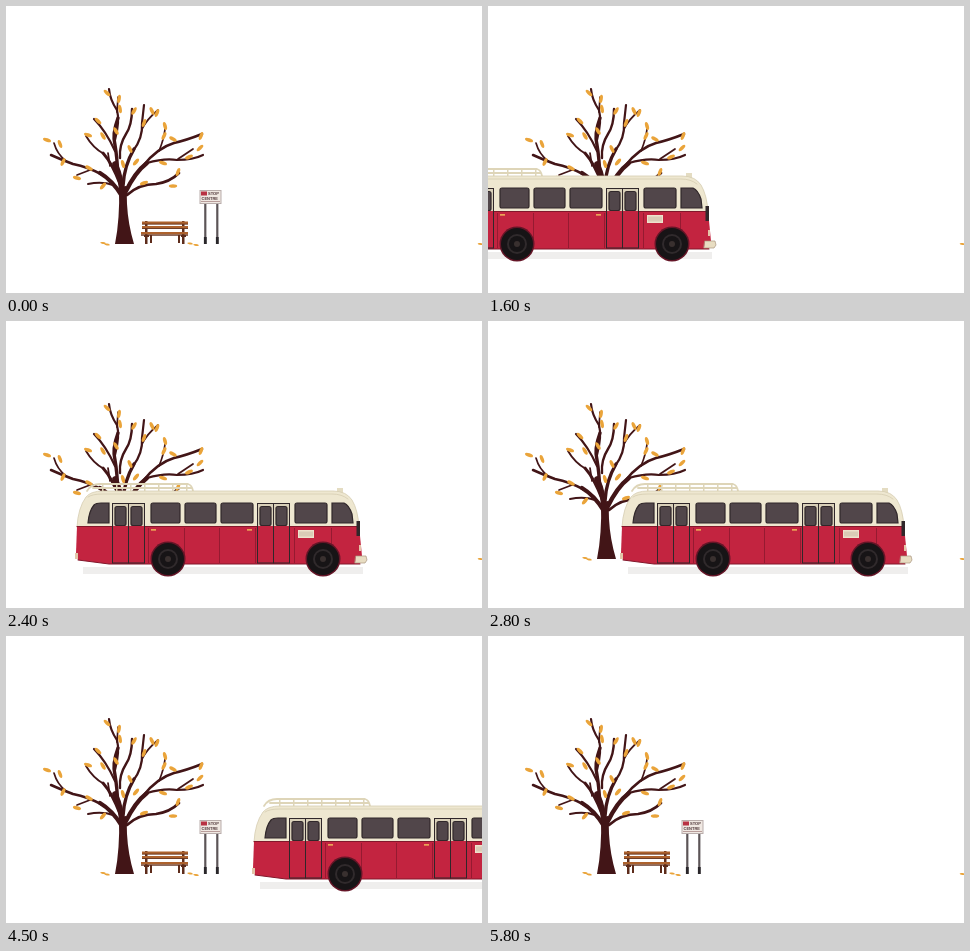
An HTML page with a canvas for the animation above (8 s loop, 476 by 287 pixels).

```html
<!DOCTYPE html>
<html lang="en">
<head>
<meta charset="utf-8">
<title>Autumn bus stop</title>
<style>
html, body { margin: 0; width: 100%; height: 100%; overflow: hidden; background: #fff; }
canvas { display: block; width: 476px; height: 287px; }
</style>
</head>
<body>
<canvas id="stage" width="476" height="287"></canvas>
<script>
const ctx = document.getElementById('stage').getContext('2d');
const LOOP = 8000, STEP = 100;
const BARK = '#421517', LEAF = '#eaa43a', CREAM = '#eee7d0', RED = '#c32440',
  DARK = '#30272a', GLASS = '#51464a', SEAM = '#82172b';

// [time, x of the rear end]
const route = [
  [100, -337], [800, -225], [1600, -64], [1800, -30], [2400, 69], [2700, 116],
  [3200, 196], [3300, 210], [3400, 222], [3500, 230], [3600, 234],
  [4400, 234], [4500, 246], [5300, 389], [5800, 479]
];

function busX(t) {
  if (t <= route[0][0]) return route[0][1];
  for (let i = 1; i < route.length; i++) {
    const [t0, x0] = route[i - 1], [t1, x1] = route[i];
    if (t <= t1) return x0 + (x1 - x0) * (t - t0) / (t1 - t0);
  }
  return 479;
}

function rect(x, y, w, h, color) {
  ctx.fillStyle = color;
  ctx.fillRect(x, y, w, h);
}

function ellipse(x, y, rx, ry, color, angle = 0) {
  ctx.fillStyle = color;
  ctx.beginPath();
  ctx.ellipse(x, y, rx, ry, angle, 0, Math.PI * 2);
  ctx.fill();
}

function shape(d, fill, stroke, width = 1) {
  const path = new Path2D(d);
  if (fill) { ctx.fillStyle = fill; ctx.fill(path); }
  if (stroke) { ctx.strokeStyle = stroke; ctx.lineWidth = width; ctx.stroke(path); }
}

const branches = [
  [6.5, 'M117 198Q116 172 109 158'],
  [4, 'M112 170Q111 150 109 139Q106 128 112 112'],
  [2.6, 'M109 134Q114 115 111 104Q104 94 103 83'],
  [2, 'M111 106L112 91'],
  [2.6, 'M109 145Q100 125 88 113'],
  [3.5, 'M114 178Q106 157 97 147'],
  [2.2, 'M98 148Q87 142 80 130'],
  [2, 'M104 160L102 147'],
  [2.8, 'M114 152Q113 139 120 128Q126 119 126 103'],
  [4, 'M117 180Q118 160 128 143'],
  [2.6, 'M127 145Q137 132 136 117L138 99'],
  [2, 'M136 123Q141 113 152 104'],
  [5, 'M119 187Q129 166 141 157'],
  [3, 'M137 160Q151 142 168 137Q181 134 196 128'],
  [2, 'M153 145Q158 133 159 123'],
  [2.6, 'M141 157Q158 152 171 154Q187 154 197 149'],
  [2, 'M172 153L187 143'],
  [3.2, 'M121 189Q133 178 150 178Q164 176 173 167'],
  [5, 'M116 190Q106 174 94 167'],
  [3, 'M97 169Q82 161 67 158Q56 154 45 149'],
  [2, 'M60 155Q51 148 48 137'],
  [2.4, 'M107 179Q96 175 82 178'],
  [2, 'M84 164L71 169']
];

// x, y, angle in degrees
const leaves = [
  [41, 134, 20], [54, 138, 70], [57, 156, 115], [71, 172, 15], [83, 162, 30],
  [82, 129, 20], [92, 115, 45], [101, 87, 45], [113, 93, 100], [114, 103, 80],
  [128, 105, 120], [146, 105, 65], [151, 107, 110], [159, 120, 75], [158, 130, 115],
  [167, 133, 30], [195, 130, 110], [194, 142, 135], [183, 151, 155], [172, 166, 110],
  [167, 180, 0], [138, 177, 160], [157, 157, 20], [124, 143, 65], [130, 156, 130],
  [117, 158, 75], [97, 180, 130], [110, 125, 60], [97, 130, 60], [138, 117, 110]
];

function drawTree() {
  ctx.lineCap = 'round';
  for (const [w, d] of branches) shape(d, null, BARK, w * 0.85);
  shape('M109 238Q114 213 113 181L120 180Q121 190 121 198Q122 218 128 238Z', BARK);
  for (const [x, y, a] of leaves) ellipse(x, y, 4.2, 1.8, LEAF, a * Math.PI / 180);
}

function drawBench() {
  const wood = '#ad622d', shade = '#5d2c1b';
  for (const x of [139, 176]) {
    rect(x, 215, 2.5, 23, shade);
    rect(x - 1, 229, 5, 2, shade);
  }
  for (const y of [215.5, 220]) {
    rect(136, y, 46, 2.8, wood);
    rect(136, y + 2.2, 46, 0.8, shade);
  }
  rect(135, 226, 47, 2.5, wood);
  rect(135, 228.5, 47, 1.2, shade);
  rect(144, 229, 2, 8, shade);
  rect(172, 229, 2, 8, shade);
}

function drawSign() {
  for (const x of [198.2, 210.2]) {
    rect(x, 197, 2.2, 41, '#5c5557');
    rect(x - 0.3, 231, 2.8, 7, '#29262a');
  }
  rect(193.5, 184, 22, 14, '#b9adab');
  rect(194.5, 185, 20, 12, '#f0e8e2');
  rect(195, 185.5, 6, 4, '#b83243');
  ctx.fillStyle = '#4c3436';
  ctx.textAlign = 'left';
  ctx.font = 'bold 4px "Liberation Sans", sans-serif';
  ctx.fillText('STOP', 202, 189);
  ctx.fillText('CENTRE', 195.5, 193.5);
  rect(195, 195, 19, 0.8, '#aa8b89');
}

function drawGroundLeaves() {
  for (const [x, y] of [[97, 237], [101, 238.5], [184, 237.5], [190, 239], [474.5, 238]])
    ellipse(x, y, 2.8, 1, LEAF, 0.15);
}

function windowPane(x, y, w, h) {
  ctx.fillStyle = GLASS;
  ctx.strokeStyle = DARK;
  ctx.lineWidth = 1.2;
  ctx.beginPath();
  ctx.roundRect(x, y, w, h, 2);
  ctx.fill();
  ctx.stroke();
}

function drawDoor(x) {
  rect(x, 183, 33, 22, '#d9d0b9');
  rect(x, 205, 33, 37, RED);
  ctx.strokeStyle = DARK;
  ctx.lineWidth = 1;
  ctx.strokeRect(x + 0.5, 182.5, 32, 59.5);
  shape(`M${x + 16.5} 183V242`, null, DARK);
  windowPane(x + 3, 185.5, 11, 19);
  windowPane(x + 19, 185.5, 11, 19);
}

function drawWheel(x) {
  ellipse(x, 238, 17.5, 17.5, '#641527');
  ellipse(x, 238, 16, 16, '#171416');
  ellipse(x, 238, 10, 10, '#302a2c');
  ellipse(x, 238, 8, 8, '#171416');
  ellipse(x, 238, 3, 3, '#39302f');
}

function drawBus(x) {
  ctx.save();
  ctx.translate(x, 0);
  rect(8, 246, 280, 7, '#efeeed');

  // Roof rack
  shape('M12 170Q16 163 25 163H113Q117 164 118 170M18 167H117', null, '#ded5b8', 1.8);
  for (let i = 0; i < 7; i++) rect(27 + i * 14, 163, 1.5, 8, '#ded5b8');
  rect(262, 167, 6, 5, '#e4dcc2');

  shape('M2 206Q3 187 11 176Q16 170 28 170H258Q271 170 277 179Q283 189 284 206Z', CREAM, '#d6cdb2', 0.8);
  shape('M13 176Q17 173 28 173H257Q267 173 273 178', null, '#d6cdb2', 0.8);
  shape('M2 205H284L287 235L285 243H34L3 239L1 232Z', RED);
  shape('M2 205.5H284M3 239L34 243H285', null, SEAM, 1);

  shape('M13 202Q14 190 19 184Q21 182 26 182H34V202Z', GLASS, DARK, 1.2);
  for (const [wx, w] of [[76, 29], [110, 31], [146, 32], [220, 32]])
    windowPane(wx, 182, w, 20);
  shape('M257 182H269Q274 184 277 193L278 202H257Z', GLASS, DARK, 1.2);

  for (const sx of [73, 109, 144, 180, 219, 256]) rect(sx, 207, 0.7, 35, SEAM);
  drawDoor(37);
  drawDoor(182);

  rect(223, 209, 16, 8, '#eee1cc');
  rect(224, 210.5, 14, 5, '#dacbb6');
  rect(76, 208, 5, 1.7, '#eba356');
  rect(172, 208, 5, 1.7, '#eba356');

  // Mirror, bumpers and lamp
  rect(281.5, 200, 3.5, 15, DARK);
  shape('M281 235H291L292 239L290 242H280Z', '#e8ddc2', '#a9957e', 0.7);
  rect(0, 232, 3, 6, '#e2c5a9');
  rect(284, 224, 2, 6, '#e5c5a9');

  drawWheel(93);
  drawWheel(248);
  ctx.restore();
}

function render(t) {
  rect(0, 0, 476, 287, '#fff');
  drawGroundLeaves();
  drawTree();
  drawBench();
  drawSign();
  drawBus(busX(t));
}

const start = performance.now();
function tick() {
  const t = (performance.now() - start) % LOOP;
  render(Math.floor(t / STEP) * STEP);
  requestAnimationFrame(tick);
}
tick();
</script>
</body>
</html>
```
